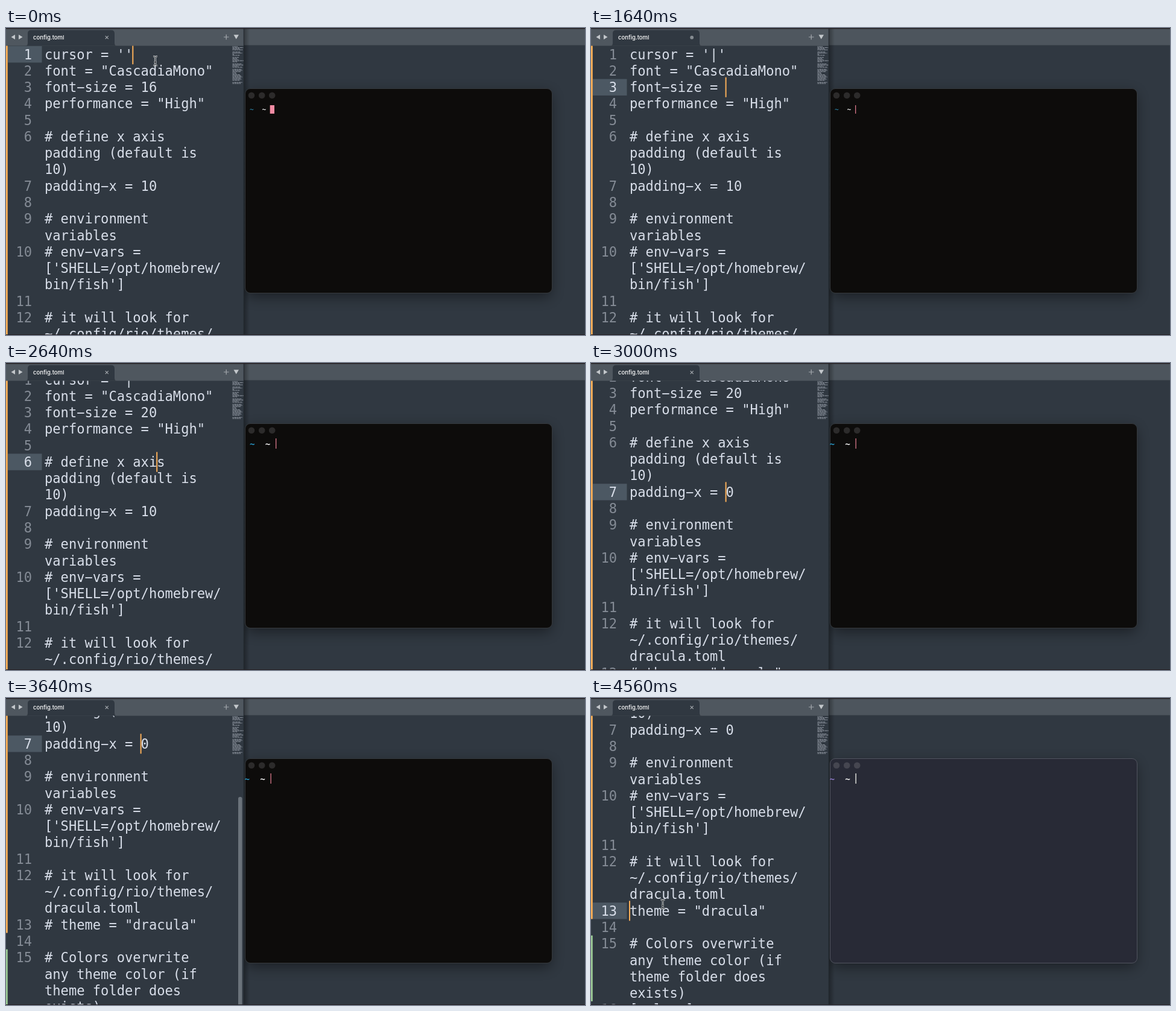
Recreate the animation shown at these times as an HTML page. Size 960 by 509 pixels, loop 4.61 s.

```html
<!DOCTYPE html>
<html lang="en">
<head>
<meta charset="utf-8">
<title>Live config reload</title>
<style>
  html, body { margin: 0; width: 100%; height: 100%; overflow: hidden; background: #303841; }
  svg { display: block; width: 960px; height: 509px; }
  text { white-space: pre; }
  .code { font: 22.1px "DejaVu Sans Mono", "Liberation Mono", monospace; fill: #d8dee9; }
  .num { fill: #848b95; text-anchor: end; }
  .num.active { fill: #d8dee9; }
  .tab { font: 500 9.5px Inter, "Open Sans", sans-serif; fill: #fff; }
  .prompt { font-family: "DejaVu Sans Mono", "Liberation Mono", monospace; font-weight: bold; }
</style>
</head>
<body>
<svg viewBox="0 0 960 509">
  <defs>
    <clipPath id="view"><rect y="29.5" width="394" height="479.5"/></clipPath>
    <linearGradient id="edge">
      <stop offset="0" stop-color="#000" stop-opacity=".35"/>
      <stop offset="1" stop-color="#000" stop-opacity="0"/>
    </linearGradient>
    <filter id="shadow" x="-20%" y="-20%" width="140%" height="150%"><feGaussianBlur stdDeviation="11"/></filter>
  </defs>

  <!-- window behind -->
  <rect width="960" height="509" fill="#303841"/>
  <rect y="1" width="960" height="27.5" fill="#4d555d"/>

  <!-- terminal -->
  <rect x="398" y="108" width="506" height="338" rx="10" filter="url(#shadow)" opacity=".42"/>
  <rect x="394" width="10" height="509" fill="url(#edge)"/>
  <rect id="term" x="396.5" y="100.5" width="509" height="339" rx="8.5"/>
  <g id="lights">
    <circle cx="407" cy="111.8" r="5.3"/><circle cx="424.2" cy="111.8" r="5.3"/><circle cx="441.2" cy="111.8" r="5.3"/>
  </g>
  <text id="dir" class="prompt">~</text>
  <text id="sign" class="prompt" fill="#f4f4f4">~</text>
  <rect id="termCursor"/>

  <!-- editor -->
  <rect width="394" height="509" fill="#303841"/>
  <rect y="1" width="394" height="28.5" fill="#4f575f"/>
  <path d="M32 29.5Q36 29.5 36 25V9Q36 3.5 41.500 3.500H174.500Q180 3.500 180 9V25Q180 29.5 184 29.5Z" fill="#303841"/>
  <path d="M15 11V19L8.500 15ZM21 11V19L27.500 15ZM377.500 11.300H386L381.700 18.500Z" fill="#c3c7cb"/>
  <path d="M361 15H369.500M365.200 10.800V19.200" stroke="#a4a9ae" stroke-width="1.2"/>
  <text class="tab" x="45" y="18.8">config.toml</text>
  <path id="close" d="M164.700 13.200L169.700 18.200M169.700 13.200L164.700 18.200" stroke="#a9aeb3" stroke-width="1.1"/>
  <circle id="dirty" cx="167.200" cy="15.700" r="2.900" fill="#858b91"/>
  <g clip-path="url(#view)">
    <g id="doc">
      <rect id="active" x="3" width="56.500" height="27.300" fill="#4c5863"/>
      <g id="marks"></g>
      <g id="lines"></g>
      <rect id="caret" width="2" height="33" fill="#f9ae58"/>
    </g>
    <g id="minimap" stroke="#d8dee9" stroke-width="1" opacity=".62"></g>
    <rect id="scrollbar" x="385" y="164" width="6.500" height="350" rx="3" fill="#6b737b"/>
  </g>
  <path d="M394.300 0V509" stroke="#22282e" stroke-width="1"/>
  <path id="pointer" d="M-3.500 -7.500Q0 -7.500 0 -5V5Q0 7.500 -3.500 7.500M3.500 -7.500Q0 -7.500 0 -5M0 5Q0 7.500 3.500 7.500M-2 2H2" fill="none"/>
  <use id="pointerFill" href="#pointer"/>
  <path d="M0 .7H960M0 508.600H960" stroke="#241f22" stroke-width="1.400"/>
</svg>
<script>
const LOOP = 4610, PITCH = 27.27, CELL = 13.3, LEFT = 64, FIRST = 43.7;
const $ = id => document.getElementById(id);
const NS = 'http://www.w3.org/2000/svg';

function set(el, attrs) {
  for (const key in attrs) el.setAttribute(key, attrs[key]);
  return el;
}
const add = (parent, tag, attrs) => parent.appendChild(set(document.createElementNS(NS, tag), attrs));
const show = (el, on) => set(el, { visibility: on ? 'visible' : 'hidden' });
const centre = row => FIRST + PITCH * row;
const wideDash = s => s.replace(/-/g, '\u2212');

// One entry per numbered line; a slash-n marks a soft wrap.
const source = [
  "cursor = ''", 'font = "CascadiaMono"', 'font-size = 16', 'performance = "High"', '',
  '# define x axis\npadding (default is\n10)', 'padding-x = 10', '',
  '# environment\nvariables', "# env-vars =\n['SHELL=/opt/homebrew/\nbin/fish']", '',
  '# it will look for\n~/.config/rio/themes/\ndracula.toml', '# theme = "dracula"', '',
  '# Colors overwrite\nany theme color (if\ntheme folder does\nexists)', '[colors]'
];

const rows = [];
source.forEach((line, i) => line.split('\n').forEach((part, j) => {
  const y = centre(rows.length) + 7.9;
  const text = add($('lines'), 'text', { class: 'code', x: LEFT, y });
  const num = j ? null : add($('lines'), 'text', { class: 'code num', x: 43, y });
  text.textContent = wideDash(part);
  if (num) num.textContent = i + 1;
  rows.push({ text, num, part });
}));

function mark(from, to, fill) {
  add($('marks'), 'rect', { x: 0, width: 2.8, y: centre(from) - PITCH / 2, height: (to - from + 1) * PITCH, fill });
}
mark(-1, 19, '#f9ae58');
mark(21, 24, '#99c794');

// Miniature of the document, with the rest of the colour table below it.
const lengths = rows.map(r => r.part.length);
for (let i = 0; i < 9; i++) lengths.push(i === 6 ? 0 : 15 + i * 7 % 5);
lengths.forEach((n, i) => {
  const y = 30.8 + i * 1.8;
  if (n) add($('minimap'), 'path', { d: `M375.500 ${y}h${n * 0.85}`, 'stroke-dasharray': `${2 + i % 3} .8 ${3 + i % 2} .6` });
});

// Each entry changes part of the state from its time on.
const timeline = [
  [0, { cursor: '', size: '16', pad: '10', theme: '# ', row: 0, col: 11, scroll: 0, dirty: false,
        shape: 'block', big: false, flush: false, dracula: false, bar: 0, pointer: [247.5, 54.5] }],
  [50, { pointer: null }],
  [140, { col: 10 }],
  [320, { cursor: '_', col: 11, dirty: true }],
  [380, { dirty: false }],
  [450, { shape: 'under' }],
  [730, { cursor: '', col: 10, dirty: true }],
  [820, { cursor: '|', col: 11 }],
  [910, { dirty: false }],
  [1000, { shape: 'beam' }],
  [1090, { row: 1 }],
  [1230, { row: 2 }],
  [1360, { col: 14 }],
  [1500, { size: '1', col: 13, dirty: true }],
  [1640, { size: '', col: 12 }],
  [1730, { size: '2', col: 13 }],
  [1950, { size: '20', col: 14 }],
  [2060, { dirty: false }],
  [2180, { big: true }],
  [2320, { row: 3 }],
  [2550, { row: 4, col: 0 }],
  [2610, { row: 5, col: 14, scroll: 16 }],
  [2680, { row: 7, col: 3, scroll: 36 }],
  [2740, { row: 8, col: 13, scroll: 48 }],
  [2810, { pad: '0', col: 12, dirty: true }],
  [2940, { dirty: false }],
  [3000, { flush: true }],
  [3550, { scroll: 88, bar: 1 }],
  [3600, { scroll: 144 }],
  [3640, { scroll: 186 }],
  [3680, { scroll: 202 }],
  [3730, { scroll: 209 }],
  [3820, { row: 19, col: 0 }],
  [3870, { bar: .6 }],
  [3920, { bar: .3 }],
  [3960, { bar: 0 }],
  [4000, { theme: ' ', dirty: true }],
  [4050, { theme: '' }],
  [4140, { dirty: false }],
  [4180, { dracula: true }],
  [4360, { pointer: [125.5, 348.5] }],
  [4430, { pointer: [123, 346] }],
  [4490, { pointer: [121, 344] }],
  [4560, { pointer: [119, 342] }]
];

function stateAt(t) {
  const state = {};
  for (const [start, change] of timeline) if (start <= t) Object.assign(state, change);
  return state;
}

function drawEditor(s) {
  const write = (row, text) => { rows[row].text.textContent = wideDash(text); };
  write(0, `cursor = '${s.cursor}'`);
  write(2, `font-size = ${s.size}`);
  write(8, `padding-x = ${s.pad}`);
  write(19, `${s.theme}theme = "dracula"`);
  rows.forEach((r, i) => r.num && r.num.classList.toggle('active', i === s.row));
  set($('doc'), { transform: `translate(0 ${-s.scroll})` });
  set($('active'), { y: centre(s.row) - PITCH / 2 });
  set($('caret'), { x: LEFT + s.col * CELL - 1, y: centre(s.row) - 16.5 });
  set($('scrollbar'), { opacity: s.bar });
  show($('dirty'), s.dirty);
  show($('close'), !s.dirty);
}

function drawTerminal(s) {
  const cell = s.big ? 8.6 : 6.8;
  const x = s.flush ? 395.5 : 404;
  const y = s.big ? 139 : 139.2;
  const font = `font-size:${cell / 0.602}px`;
  const top = s.big ? 125 : 128, bottom = 142;
  const under = s.shape === 'under', block = s.shape === 'block';
  set($('term'), { fill: s.dracula ? '#282a36' : '#0d0c0b', stroke: s.dracula ? '#51545f' : '#363a3e' });
  set($('lights'), { fill: s.dracula ? '#454650' : '#2c2b2b' });
  set($('dir'), { x, y, style: font, fill: s.dracula ? '#8d78c9' : s.big ? '#2796c4' : '#2a7fa0' });
  set($('sign'), { x: x + cell * 3, y, style: font });
  set($('termCursor'), {
    x: x + cell * 5 - (block ? .3 : 0), y: under ? bottom - 1.5 : top,
    width: block || under ? 7.3 : 1.3, height: under ? 1.5 : bottom - top,
    fill: s.dracula ? '#f8f8f2' : s.shape === 'beam' ? '#d9788b' : '#f38ba3'
  });
}

function drawPointer(at) {
  for (const el of [$('pointer'), $('pointerFill')]) show(el, at);
  if (!at) return;
  set($('pointer'), { transform: `translate(${at})`, stroke: '#e8ecef', 'stroke-width': 2.6 });
  set($('pointerFill'), { visibility: 'hidden' });
  set($('pointerCore'), { transform: `translate(${at})` });
}

// Dark core drawn over the light outline of the I-beam.
const core = $('pointer').cloneNode();
set(core, { id: 'pointerCore', stroke: '#15181b', 'stroke-width': 1 });
$('pointerFill').replaceWith(core);

function drawIBeam(at) {
  for (const el of [$('pointer'), core]) {
    show(el, at);
    if (at) set(el, { transform: `translate(${at[0]} ${at[1]})` });
  }
}
set($('pointer'), { stroke: '#e8ecef', 'stroke-width': 2.6 });

function render(t) {
  const s = stateAt(t);
  drawEditor(s);
  drawTerminal(s);
  drawIBeam(s.pointer);
}

const start = performance.now();
function tick() {
  render((performance.now() - start) % LOOP);
  requestAnimationFrame(tick);
}
tick();
</script>
</body>
</html>
```
